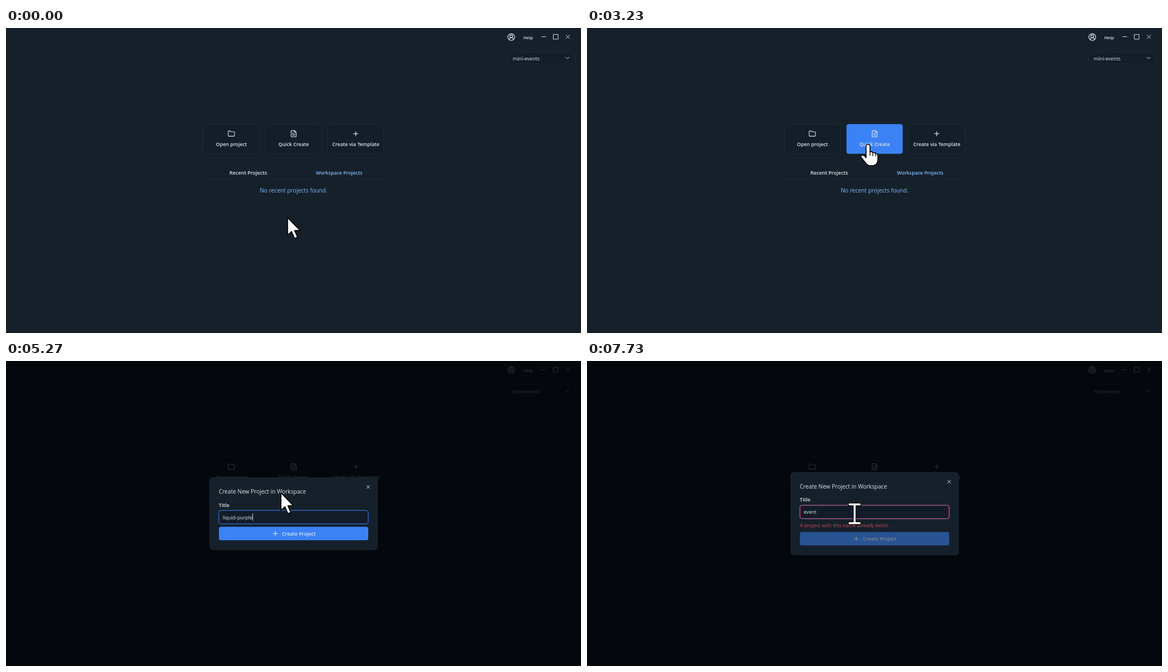
Recreate the animation shown at these times as an HTML page. Size 1027x545 px, loop 8000 ms.

```html
<!DOCTYPE html>
<html lang="en">
<head>
<meta charset="utf-8">
<title>Create project</title>
<style>
  html, body { margin: 0; width: 100%; height: 100%; overflow: hidden; background: #15202a; }
  svg { display: block; width: 100%; height: 100%; font-family: "Open Sans", "Noto Sans", sans-serif; font-size: 8.9px; }
  text { fill: #dde4ea; white-space: pre; }
  .semi { font-weight: 600; }
  .mid { text-anchor: middle; }
  .link { fill: #84bbfa; }
  .icon { fill: none; stroke: #dde4ea; stroke-width: 2; stroke-linecap: round; stroke-linejoin: round; }
  .win { fill: none; stroke: #d5dce2; stroke-width: 1; }
  .card { fill: #141e28; stroke: #1c2935; }
  .pointer { fill: #fff; stroke: #000; stroke-width: 1.6; stroke-linejoin: round; }
</style>
</head>
<body>
<svg viewBox="0 0 1027 545">
  <rect width="1027" height="545" fill="#15202a"/>

  <g class="icon" transform="translate(895.2 8.8) scale(.61)">
    <circle cx="12" cy="12" r="10"/><circle cx="12" cy="10" r="4"/><path d="M18 20a6 6 0 0 0-12 0"/>
  </g>
  <text class="semi" x="924" y="19.5" font-size="7.8">Help</text>
  <path class="win" d="M956.5 15.5h8M977.5 11.5h8.5v8.5h-8.5zM1000 12.2l7 7M1007 12.2l-7 7"/>
  <rect class="card" x="896.5" y="43" width="120" height="21.5" rx="3"/>
  <text x="905" y="57.7">mini-events</text>
  <path class="win" d="M999.7 51.8l3.2 3.2 3.2-3.2"/>

  <rect class="card" x="352.5" y="171.5" width="100" height="53" rx="4"/>
  <rect class="card" x="463.5" y="171.5" width="100" height="53" rx="4"/>
  <rect class="card" x="574.5" y="171.5" width="100" height="53" rx="4"/>
  <rect id="hover" x="463.5" y="171.8" width="100.3" height="52.9" rx="4" fill="#3b82f6"/>
  <g class="icon">
    <path transform="translate(395.8 182.2) scale(.56)" d="M20 20a2 2 0 0 0 2-2V8a2 2 0 0 0-2-2h-7.9a2 2 0 0 1-1.7-.9l-.8-1.2A2 2 0 0 0 7.9 3H4a2 2 0 0 0-2 2v13a2 2 0 0 0 2 2z"/>
    <path transform="translate(507.1 182.2) scale(.56)" d="M15 2H6a2 2 0 0 0-2 2v16a2 2 0 0 0 2 2h12a2 2 0 0 0 2-2V7zM14 2v4a2 2 0 0 0 2 2h4M10 9H8M16 13H8M16 17H8"/>
    <path transform="translate(617.9 182.2) scale(.56)" d="M5 12h14M12 5v14"/>
  </g>
  <g class="semi mid" font-size="8.8">
    <text x="402.7" y="211.2">Open project</text>
    <text x="513.8" y="211.2">Quick Create</text>
    <text x="624.8" y="211.2">Create via Template</text>
    <text x="432.6" y="262.2" font-size="9">Recent Projects</text>
    <text class="link" x="595" y="262.2">Workspace Projects</text>
  </g>
  <path d="M352 270.5h324" stroke="#1e2b37"/>
  <text class="link mid" x="513.6" y="293.8" font-size="10.2">No recent projects found.</text>

  <rect id="dim" width="1027" height="545" fill="#000206"/>

  <g id="modal">
    <rect id="panel" x="364" width="299.5" y=".3" rx="5" fill="#15202a" stroke="#1b2834"/>
    <path class="win" d="M643.8 13.8l6 6M649.8 13.8l-6 6"/>
    <text x="380" y="29" font-size="10.15">Create New Project in Workspace</text>
    <text class="semi" x="380" y="52.2" font-size="9.1">Title</text>
    <rect x="379.9" y="58.2" width="267.4" height="24.9" rx="4" fill="#121c28" stroke="#2d5cab"/>
    <rect id="field" x="380.6" y="58.9" width="266" height="23.5" rx="3.3" fill="none"/>
    <text id="value" x="387" y="74.2"></text>
    <rect id="caret" y="64" width="1" height="13" fill="#cfd7de"/>
    <text id="error" x="380" y="98.4" style="fill:#cc484b"></text>
    <g id="submit">
      <rect x="380.3" width="266.7" height="24" rx="3.5" fill="#3b82f6"/>
      <path d="M476.8 12h8.6M481.1 7.7v8.6" stroke="#dde4ea" stroke-width="1.1"/>
      <text class="semi" x="493" y="15.4" font-size="8.8">Create Project</text>
    </g>
  </g>

  <g id="cursor">
    <path id="arrow" class="pointer" d="M0 0V31L7 24.6 12.4 37 17.6 34.8 12.4 22.8H22.2Z"/>
    <g id="hand" class="pointer">
      <path d="M-3.5 3.5a3.5 3.5 0 0 1 7 0V13.5q4-1.5 5 1.5 4.2-1.5 5 1.5 4-.5 4 3.5V26q0 12-10.5 12H4q-5 0-8-4.5L-12 23.5q-1.5-3 1.5-4.2 2.5-.8 4.5 1.7l2.5 3z"/>
      <path d="M3.5 13.5v7M8.5 15v6M13.5 16.5v5" stroke-width="1.3"/>
    </g>
    <g id="beam" fill="none">
      <path d="M-11.8-16.8H11.8M-11.8 16.8H11.8M0-17V17" stroke="#000" stroke-width="6"/>
      <path d="M-10.5-16.8H10.5M-10.5 16.8H10.5M0-17V17" stroke="#fff" stroke-width="3.5"/>
    </g>
  </g>
</svg>
<script>
const LOOP = 8000;
const $ = Object.fromEntries([...document.querySelectorAll('[id]')].map(el => [el.id, el]));
const clamp = v => Math.max(0, Math.min(1, v));
const ramp = (t, from, length) => clamp((t - from) / length);
const easeOut = p => 1 - (1 - p) ** 2;
const mix = (a, b, p) => `rgb(${a.map((v, i) => Math.round(v + (b[i] - v) * p))})`;
const set = (el, attrs) => { for (const k in attrs) el.setAttribute(k, attrs[k]); };
const show = (el, on) => el.setAttribute('visibility', on ? 'visible' : 'hidden');

const BLUE = [42, 88, 168], RED = [214, 76, 92];

// Pointer moves: start, duration, from, control, to
const moves = [
  [1590, 800, [503, 339], [554.5, 264.6], [511.6, 178]],
  [2400, 830, [511.6, 178], [507.5, 193], [502, 208]],
  [3240, 830, [502, 208], [501.3, 211.3], [500.5, 214.5]],
  [5100, 830, [500.5, 214.5], [487, 243], [478, 273]]
];

// Field contents over time: time, text, error
const EMPTY = 'Project name cannot be empty', TAKEN = 'A project with this name already exists';
const edits = [
  [3970, 'liquid-purple', ''],
  [6000, '', EMPTY],
  [6500, 'e', ''],
  [6830, 'ev', ''],
  [6930, 'eve', ''],
  [7070, 'even', ''],
  [7230, 'event', TAKEN]
];

function pointerAt(t) {
  const [start, length, a, c, b] = moves.findLast(m => t >= m[0]) || moves[0];
  const p = easeOut(ramp(t, start, length)), q = 1 - p;
  return a.map((v, i) => q * q * v + 2 * p * q * c[i] + p * p * b[i]);
}

function drawModal(t) {
  const open = ramp(t, 4240, 530);
  set($.dim, { opacity: 0.8 * open ** 0.6 });
  show($.modal, open > 0);

  const [since, text, error] = edits.findLast(e => t >= e[0]) || edits[0];
  const height = error ? 147 : 128.5;
  const scale = 0.95 + 0.05 * open;
  const top = 272.6 - height / 2;
  set($.modal, {
    opacity: open,
    transform: `translate(513.75 ${272.6 + 2 * (1 - open)}) scale(${scale}) translate(-513.75 ${top - 272.6})`
  });
  set($.panel, { height });

  const red = ramp(t, 6040, 150) * (1 - ramp(t, 6490, 140)) + ramp(t, 7220, 110);
  set($.field, { stroke: mix(BLUE, RED, red) });

  $.value.textContent = text;
  const caretX = 387 + (text ? $.value.getComputedTextLength() : 0);
  if (!text) $.value.textContent = 'Enter Project Title';
  $.value.style.fill = text ? '#dde4ea' : '#8dbdf6';
  set($.caret, { x: caretX, opacity: Math.floor((t - since) / 500) % 2 ? 0 : 1 });

  $.error.textContent = error;
  set($.submit, { transform: `translate(0 ${error ? 106.5 : 88})`, opacity: error ? 0.52 : 1 });
}

function drawPointer(t) {
  const [x, y] = pointerAt(t);
  const inField = t > 5100 && y > 266.5;
  const onButton = t < 5120 && y < 224.5;
  const press = ramp(t, 4100, 150) * (1 - ramp(t, 4500, 250));
  show($.beam, inField);
  show($.hand, onButton);
  show($.arrow, !inField && !onButton);
  set($.cursor, {
    transform: `translate(${x + 2.5} ${y + 19}) scale(${1 - 0.12 * press}) translate(-2.5 -19)`
  });
}

function draw(t) {
  set($.hover, { opacity: ramp(t, 1980, 150) * (1 - ramp(t, 4530, 150)) });
  drawModal(t);
  drawPointer(t);
}

const begin = performance.now();
function tick() {
  draw((performance.now() - begin) % LOOP);
  requestAnimationFrame(tick);
}
tick();
</script>
</body>
</html>
```
